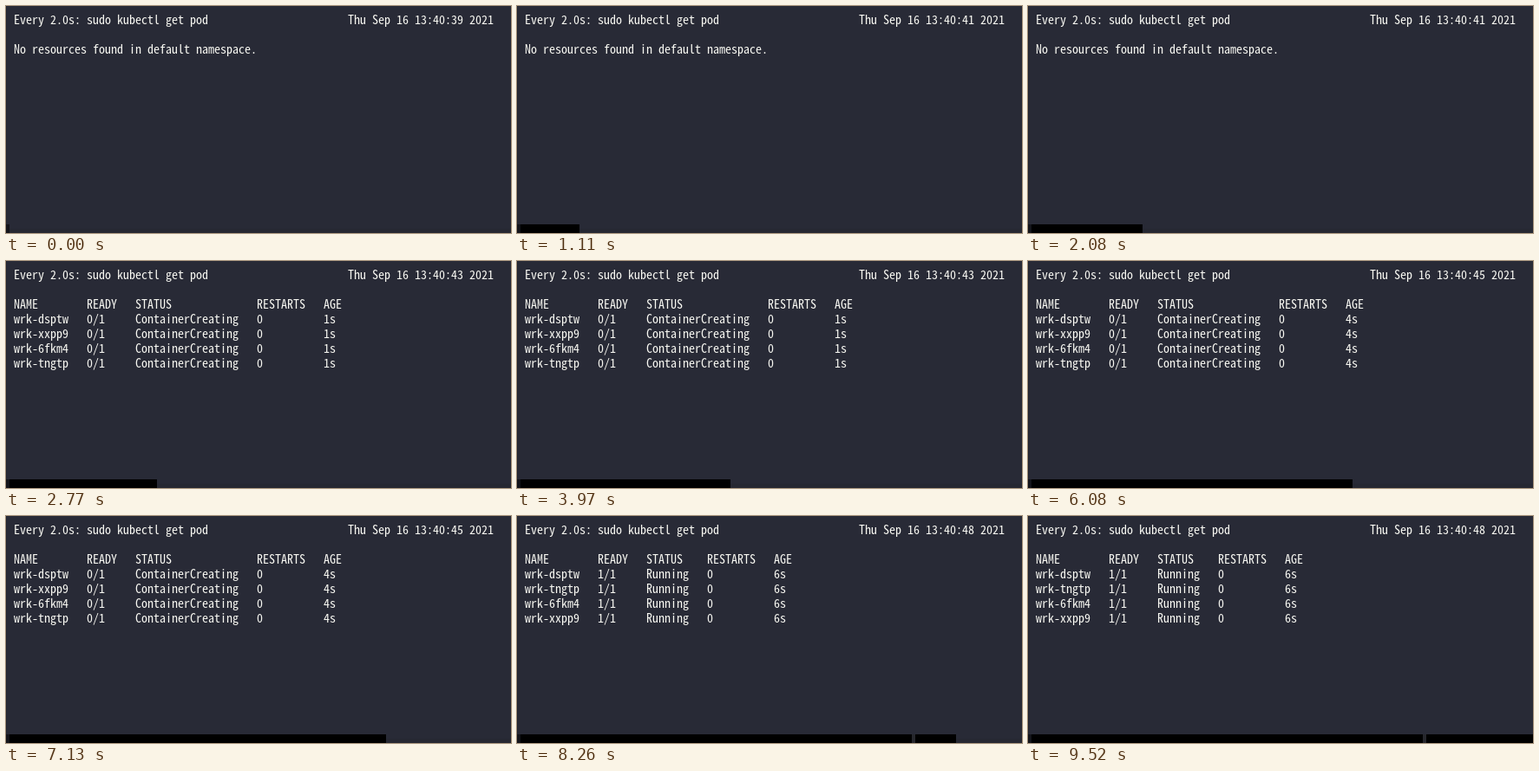
Recreate the animation shown at these times as an HTML page. Size 582 px wide and 262 px high, loop 9.59 s.

```html
<!DOCTYPE html>
<html lang="en">
<head>
<meta charset="utf-8">
<title>Terminal watch</title>
<style>
  html, body { margin: 0; width: 100%; height: 100%; overflow: hidden; background: #282a36; }
  svg { display: block; width: 582px; height: 262px; }
  text {
    font-family: "Noto Sans Mono CJK KR", "Noto Sans Mono CJK JP", "Noto Sans Mono", "DejaVu Sans Mono", monospace;
    fill: #f8f8f2;
    white-space: pre;
    font-variant-ligatures: none;
  }
</style>
</head>
<body>
<svg viewBox="0 0 582 262">
  <rect width="582" height="262" fill="#282a36"/>
  <rect y="257" width="582" height="5" fill="#262832"/>
  <rect width="1" height="262" fill="#24262f"/>
  <g id="lines"></g>
  <rect id="bar" x="4" y="252" height="10" fill="#000"/>
  <rect y="252" width="4" height="10" fill="#14151b"/>
  <rect id="notch" x="455" y="252" width="4" height="10" fill="#26272d"/>
</svg>
<script>
const LOOP = 9590, STEPS = 137, WIDTH = 582;
const CELL = 7, LEFT = 9, BASELINE = 21, LINE = 17;
const NOTCH_STEP = 107;

// [step, time in ms]; steps between are evenly spaced
const clock = [[0, 0], [1, 70], [15, 1040], [29, 2010], [43, 2980], [57, 3970], [71, 4950],
  [85, 5940], [99, 6920], [113, 7900], [127, 8890], [136, 9520], [137, LOOP]];

const startTimes = [];
for (let i = 1; i < clock.length; i++) {
  const [s0, t0] = clock[i - 1], [s1, t1] = clock[i];
  for (let s = s0; s < s1; s++) {
    startTimes.push(Math.round((t0 + (t1 - t0) * (s - s0) / (s1 - s0)) / 10) * 10);
  }
}

const header = second =>
  "Every 2.0s: sudo kubectl get pod".padEnd(55) + `Thu Sep 16 13:40:${second} 2021`;

function table(pods, ready, status, age) {
  const statusWidth = status.length + 3;
  const row = (name, rdy, stat, restarts, old) =>
    name.padEnd(12) + rdy.padEnd(8) + stat.padEnd(statusWidth) + restarts.padEnd(11) + old;
  return [row("NAME", "READY", "STATUS", "RESTARTS", "AGE"),
    ...pods.map(pod => row("wrk-" + pod, ready, status, "0", age))];
}

const empty = ["No resources found in default namespace."];
const pending = ["dsptw", "xxpp9", "6fkm4", "tngtp"];
const running = ["dsptw", "tngtp", "6fkm4", "xxpp9"];

const screens = [
  { step: 0, second: 39, body: empty },
  { step: 2, second: 41, body: empty },
  { step: 37, second: 43, body: table(pending, "0/1", "ContainerCreating", "1s") },
  { step: 72, second: 45, body: table(pending, "0/1", "ContainerCreating", "4s") },
  { step: NOTCH_STEP, second: 48, body: table(running, "1/1", "Running", "6s") }
];

const lines = document.getElementById("lines");
const bar = document.getElementById("bar");
const notch = document.getElementById("notch");

const rows = Array.from({ length: 7 }, (_, i) => {
  const text = document.createElementNS("http://www.w3.org/2000/svg", "text");
  text.setAttribute("x", LEFT);
  text.setAttribute("y", BASELINE + i * LINE);
  return lines.appendChild(text);
});

// Choose the font size whose advance equals one terminal cell
const pen = document.createElement("canvas").getContext("2d");
pen.font = "100px " + getComputedStyle(rows[0]).fontFamily;
lines.style.fontSize = CELL * 100 / pen.measureText("0").width + "px";

let shownStep = -1, shownScreen = null;

function draw(time) {
  const step = startTimes.findLastIndex(start => start <= time);
  if (step === shownStep) return;
  shownStep = step;
  bar.setAttribute("width", Math.max(0, Math.round((step + 1) * WIDTH / STEPS) - 4));
  notch.style.display = step >= NOTCH_STEP ? "" : "none";

  const screen = screens.findLast(s => s.step <= step);
  if (screen === shownScreen) return;
  shownScreen = screen;
  const content = [header(screen.second), "", ...screen.body];
  rows.forEach((row, i) => { row.textContent = content[i] || ""; });
}

const origin = performance.now();
function tick() {
  draw((performance.now() - origin) % LOOP);
  requestAnimationFrame(tick);
}
tick();
</script>
</body>
</html>
```
